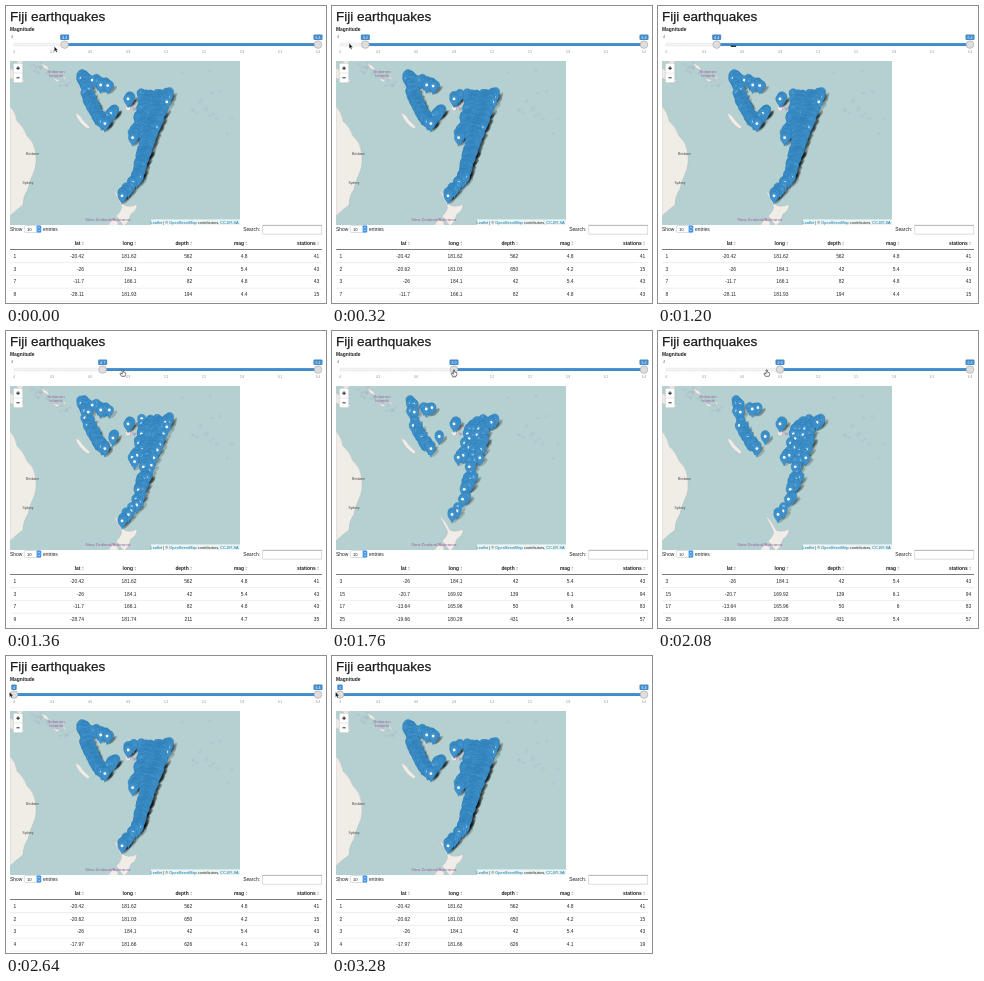
Write an HTML page that moves like this. It is 320x297 px and loops after 3440 ms.

```html
<!DOCTYPE html>
<html lang="en">
<head>
<meta charset="utf-8">
<title>Fiji earthquakes</title>
<style>
html, body { margin: 0; width: 100%; height: 100%; overflow: hidden; background: #fff; }
svg { display: block; width: 100vw; height: 100vh; font-family: "Liberation Sans", Arial, sans-serif; font-size: 4.9px; fill: #222; }
.title { font-size: 13.5px; fill: #1c1c1c; stroke: #1c1c1c; stroke-width: .25; }
.bold { font-weight: bold; }
.end { text-anchor: end; }
.tag { fill: #428bca; }
.tagText { fill: #fff; font-size: 3.7px; text-anchor: middle; }
.grid { fill: #888; font-size: 3px; text-anchor: middle; }
.land { fill: #f0ede6; stroke: #b7b2bd; stroke-width: .4; }
.islet { fill: none; stroke: #9c96b4; stroke-width: .35; opacity: .5; }
.place { fill: #9a62a0; font-size: 4.4px; text-anchor: middle; }
.city { fill: #444; font-size: 3.3px; text-anchor: middle; }
.knob { fill: #dedede; stroke: #a5a5a5; stroke-width: .6; }
.box { fill: #fff; stroke: #bbb; stroke-width: .5; }
.link { fill: #0078a8; }
</style>
</head>
<body>
<svg viewBox="0 0 320 297" preserveAspectRatio="none">
  <defs>
    <clipPath id="mapClip"><rect x="4" y="55" width="230" height="164"/></clipPath>
    <g id="pin">
      <path d="M0 8.6C-.8 5.4-4.2 3.6-4.2-.2A4.2 4.2 0 0 1 4.2-.2C4.2 3.6.8 5.4 0 8.6Z" fill="#3f92cc" stroke="#2f7bb2" stroke-width=".45"/>
      <circle r="1.4" fill="#fff"/>
    </g>
    <ellipse id="shade" cx="4" cy="4.6" rx="5" ry="1.9" transform="rotate(-45 4 4.6)" opacity=".17" fill="#000"/>
    <path id="sort" d="M-1.1-.4L0-1.9L1.1-.4ZM-1.1.4L0 1.9L1.1.4Z" fill="#bbb"/>
  </defs>
  <rect width="320" height="297" fill="#fff"/>
  <text class="title" x="4" y="15.3">Fiji earthquakes</text>
  <text class="bold" x="4" y="25.3">Magnitude</text>

  <g id="scale"></g>
  <rect x="8" y="37.2" width="304" height="2.7" rx="1" fill="#f4f4f4" stroke="#d6d6d6" stroke-width=".4"/>
  <rect id="bar" y="37.1" height="2.9" fill="#428bca"/>
  <text id="minText" x="5" y="32.4" font-size="3.7" fill="#666">4</text>
  <rect id="fromBox" class="tag" y="28.4" height="5.6" rx="1"/><text id="fromText" class="tagText" y="32.5"></text>
  <rect class="tag" x="307.5" y="28.4" width="9" height="5.6" rx="1"/><text class="tagText" x="312" y="32.5">6.4</text>
  <circle id="knob" class="knob" cy="38.6" r="3.8"/>
  <circle class="knob" cx="312" cy="38.6" r="3.8"/>

  <g clip-path="url(#mapClip)">
    <rect x="4" y="55" width="230" height="164" fill="#b5d0d0"/>
    <g id="islets"></g>
    <path class="land" d="M4 100Q10 107 11 115Q18 121 21 130Q28 136 29 144Q32 158 27 168Q23 176 22 183Q17 190 17 199Q10 204 4 210Z"/>
    <path class="land" d="M4 62Q12 66 14 72L20 75L13 76L4 72ZM10 55H18L14 59Z"/>
    <path class="land" d="M35 57L41 60L44 65L38 62ZM46 72L54 74L51 76ZM56 68L61 74L58 73Z"/>
    <path class="land" d="M69 107Q74 108 77 114L84 121L82 123Q72 117 69 107Z"/>
    <path class="land" d="M119 101L125 99L127 103L121 105ZM128 96L132 95L129 99Z"/>
    <path class="land" d="M107 184Q114 190 118 199Q124 202 131 198Q131 205 125 208L122 216L118 220L110 210Q117 204 115 199ZM102 219L107 213L112 216V220Z"/>
    <text class="place" x="50" y="67">Solomon</text>
    <text class="place" x="50" y="71.4">Islands</text>
    <text class="place" x="127" y="104">Fiji</text>
    <text class="place" x="102" y="214.8">New Zealand/Aotearoa</text>
    <text class="city" x="26.5" y="148.8">Brisbane</text>
    <text class="city" x="22" y="178">Sydney</text>
    <g id="shades"></g>
    <g id="pins"></g>
    <rect x="145" y="213.4" width="89" height="5.6" fill="#fff" opacity=".75"/>
    <text x="232.6" y="217.6" class="end" font-size="3.9"><tspan class="link">Leaflet</tspan> | © <tspan class="link">OpenStreetMap</tspan> contributors, <tspan class="link">CC-BY-SA</tspan></text>
  </g>
  <rect class="box" x="7.3" y="57.3" width="9.5" height="19.4" rx="1.5"/>
  <path d="M7.3 67H16.8" stroke="#ccc" stroke-width=".5"/>
  <path d="M10.2 62.2H13.9M12.05 60.35V64.05M10.5 71.8H13.6" stroke="#111" stroke-width=".9"/>

  <text x="4" y="224.8">Show</text>
  <rect class="box" x="18.3" y="219.5" width="16.5" height="7" rx="1.3"/>
  <text x="21" y="224.6" font-size="4.2">10</text>
  <rect x="30.6" y="219.4" width="4.6" height="7.2" rx="1.2" fill="#3d93ea"/>
  <path d="M31.7 222.4L32.9 220.9L34.1 222.4M31.7 223.6L32.9 225.1L34.1 223.6" fill="none" stroke="#fff" stroke-width=".5"/>
  <text x="37" y="224.8">entries</text>
  <text x="254" y="225.3" class="end">Search:</text>
  <rect class="box" x="256.8" y="219.3" width="59" height="8.8"/>
  <path d="M256.8 219.3H315.8" stroke="#888" stroke-width=".5"/>
  <g id="table"></g>
  <g id="cursor">
    <path id="arrow" d="M0 0V5.2L1.2 4.1L2 6L2.900 5.6L2.1 3.8H3.7Z" fill="#111" stroke="#fff" stroke-width=".3"/>
    <path id="hand" d="M-.6-1.5Q0-2.3.6-1.5V.6L2.5 1.1Q3.1 1.5 2.8 3L2.2 4.8H-1.300L-2.8 2.2Q-2.6 1.2-1.7 1.7L-.6 2.6Z" fill="#fff" stroke="#222" stroke-width=".6"/>
    <path id="grip" d="M-3-.5Q-2.4-1.6-1.5-.9Q-.7-1.7 0-.9Q.8-1.7 1.5-.9Q2.5-1.5 3-.5L2.3.6H-2Z" fill="#2b3a46"/>
  </g>
</svg>
<script>
const LOOP = 3440, STEP = 80, LEAD = 60;
const $ = id => document.getElementById(id);
const add = (parent, tag, attrs, text = '') => {
  const node = document.createElementNS('http://www.w3.org/2000/svg', tag);
  for (const key in attrs) node.setAttribute(key, attrs[key]);
  node.textContent = text;
  return parent.appendChild(node);
};
const set = (id, attrs) => { for (const key in attrs) $(id).setAttribute(key, attrs[key]); };
const show = (node, on) => { node.style.display = on ? '' : 'none'; };
const mix = (a, b, p) => a + (b - a) * p;
const ramp = (t, from, to) => Math.min(1, Math.max(0, (t - from) / (to - from)));
const magX = mag => 8 + (mag - 4) * 304 / 2.4;

let seed = 11;
const random = () => {
  seed = (seed * 1664525 + 1013904223) % 4294967296;
  return seed / 4294967296;
};
const spread = size => (random() * 2 - 1) * size;

// Slider scale
for (let i = 0; i <= 24; i++) {
  const x = magX(4 + i / 10), major = i % 3 === 0;
  add($('scale'), 'path', { d: `M${x} 40.8v${major ? 1.6 : .8}`, stroke: '#ddd', 'stroke-width': .3 });
  if (major) add($('scale'), 'text', { class: 'grid', x, y: 47 }, String(4 + i / 10));
}

// Faint islets: a dense chain in the north-west, a few in the east
for (let i = 0; i < 36; i++) {
  const p = random(), chain = i < 20;
  add($('islets'), 'ellipse', {
    class: 'islet', rx: 1 + random(), ry: .6 + random() * .6,
    cx: chain ? mix(24, 72, p) + spread(4) : mix(172, 230, p),
    cy: chain ? mix(57, 86, p) + spread(5) : mix(60, 130, random())
  });
}

// Quake markers scattered along curved bands
const band = (count, start, bend, end, wide, narrow) =>
  Array.from({ length: count }, () => {
    const p = random(), w = mix(wide, narrow, p);
    const [x, y] = [0, 1].map(i => mix(mix(start[i], bend[i], p), mix(bend[i], end[i], p), p));
    return { x: x + spread(w), y: y + spread(2), mag: 4 + .75 * Math.sqrt(-Math.log(1 - random())) };
  });
const quakes = [
  band(150, [78, 67], [80, 98], [99, 116], 3.5, 2.5),
  band(20, [85, 73], [98, 78], [103, 79], 4, 3),
  band(16, [100, 117], [104, 104], [110, 104], 2, 1),
  band(10, [121, 94], [122, 90], [128, 89], 1, 1),
  band(270, [158, 86], [143, 128], [131, 171], 6.5, 2),
  band(26, [131, 171], [124, 180], [116, 188], 2, 1.5),
  band(110, [140, 88], [141, 106], [127, 130], 6, 2),
  band(100, [150, 90], [147, 112], [138, 130], 6, 4)
].flat().sort((a, b) => a.y - b.y);
for (const q of quakes) {
  const at = { x: q.x.toFixed(1), y: q.y.toFixed(1) };
  q.nodes = [add($('shades'), 'use', { href: '#shade', ...at }), add($('pins'), 'use', { href: '#pin', ...at })];
}

// Table text: id, lat, long, depth, mag, stations
const records = `1 -20.42 181.62 562 4.8 41
2 -20.62 181.03 650 4.2 15
3 -26 184.1 42 5.4 43
4 -17.97 181.66 626 4.1 19
7 -11.7 166.1 82 4.8 43
8 -28.11 181.93 194 4.4 15
9 -28.74 181.74 211 4.7 35
15 -20.7 169.92 139 6.1 94
17 -13.64 165.96 50 6 83
25 -19.66 180.28 431 5.4 57`.split('\n').map(line => line.split(' '));
const columns = { lat: 78, long: 130.5, depth: 186.3, mag: 241.6, stations: 313.3 };
const table = $('table');
for (const name in columns) {
  add(table, 'text', { class: 'bold end', x: columns[name] - 3.6, y: 239 }, name);
  add(table, 'use', { href: '#sort', x: columns[name] - 1.2, y: 237.3 });
}
const cells = [0, 1, 2, 3].map(i => {
  const y = 251.8 + i * 12.8;
  add(table, 'path', { d: `M4 ${y + 4.8}H316`, stroke: '#ddd', 'stroke-width': .5 });
  return [
    add(table, 'text', { x: 7.6, y }),
    ...Object.values(columns).map(x => add(table, 'text', { class: 'end', x, y }))
  ];
});
add(table, 'path', { d: 'M4 243.5H316', stroke: '#222', 'stroke-width': .6 });

// Three drags: down to the minimum, up with a small overshoot, and back down
const magAt = t => 4.4 - .4 * ramp(t, 0, 520)
  + .9 * ramp(t, 1000, 1440) + .1 * Math.sin(Math.PI * ramp(t, 1440, 1720))
  - .9 * ramp(t, 2070, 2670);

let shown = null;
function drawMag(mag) {
  if (mag === shown) return;
  shown = mag;
  const x = magX(mag), width = Number.isInteger(mag) ? 5.4 : 9;
  set('bar', { x, width: 312 - x });
  set('knob', { cx: x });
  set('fromBox', { x: x - width / 2, width });
  set('fromText', { x });
  $('fromText').textContent = mag;
  show($('minText'), mag > 4);
  for (const q of quakes) q.nodes.forEach(node => show(node, q.mag >= mag));
  records.filter(r => r[4] >= mag).slice(0, 4).forEach((r, i) =>
    r.forEach((value, j) => { cells[i][j].textContent = value; }));
}

function drawCursor(t) {
  const kind = t < 1040 || t >= 2560 ? 'arrow' : t < 1280 ? 'grip' : 'hand';
  const away = ramp(t, 640, 800) - ramp(t, 960, 1040);
  const x = magX(magAt(t + LEAD)) - (kind === 'arrow' ? 4.5 : 0);
  const y = 36 + 4.5 * ramp(x, 4, 48);
  set('cursor', { transform: `translate(${x - 20 * away} ${y})` });
  for (const id of ['arrow', 'hand', 'grip']) show($(id), id === kind);
}

function draw(time) {
  const t = Math.floor(time % LOOP / STEP) * STEP;
  drawMag(Math.round(magAt(t) * 10) / 10);
  drawCursor(t);
}

const start = performance.now();
function tick() {
  draw(performance.now() - start);
  requestAnimationFrame(tick);
}
tick();
</script>
</body>
</html>
```
